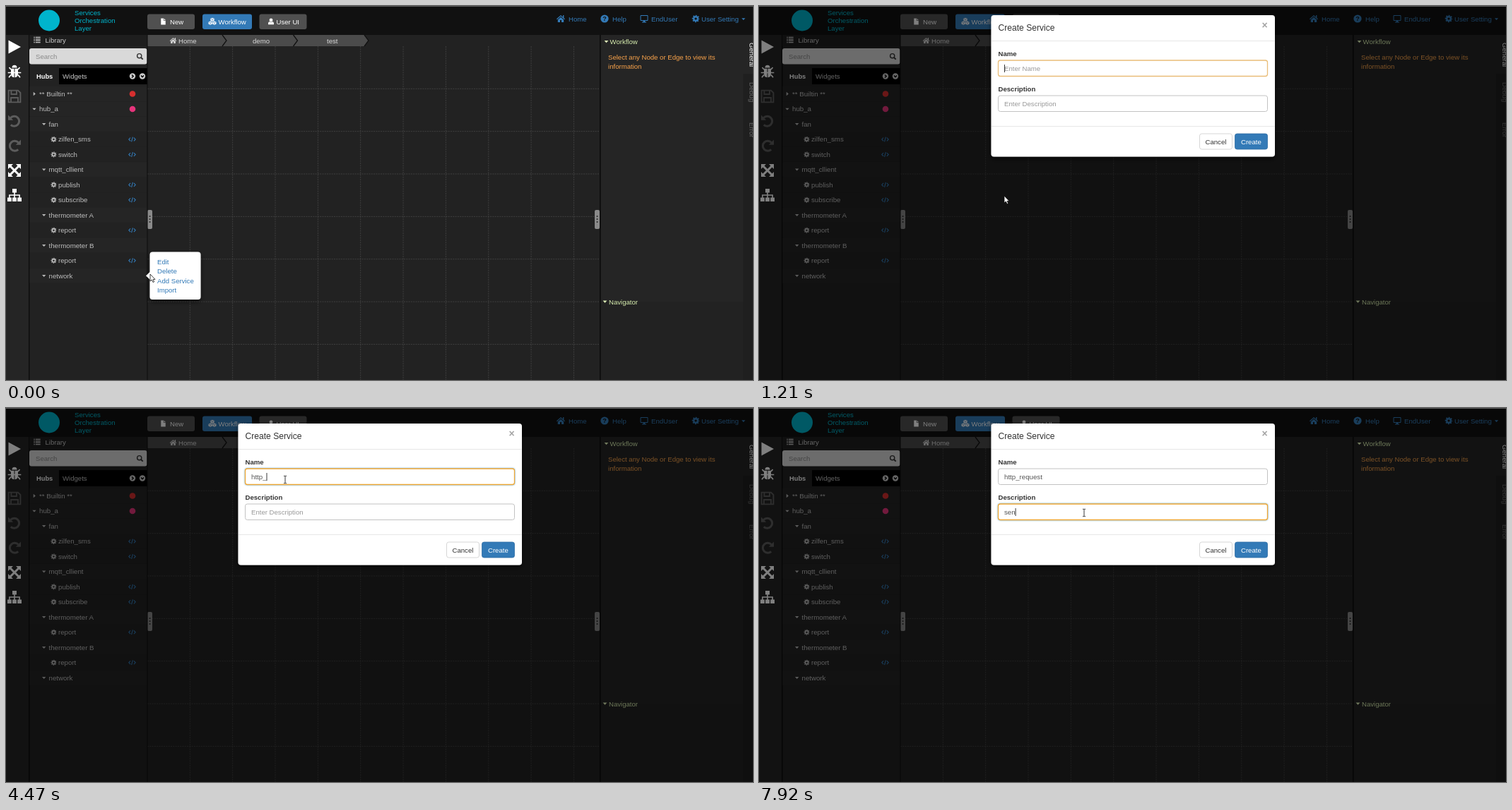
An HTML page for the animation above (8 s loop, 1057 by 530 pixels).

```html
<!DOCTYPE html>
<html lang="en">
<head>
<meta charset="utf-8">
<title>Create Service</title>
<style>
html, body { margin: 0; width: 100%; height: 100%; overflow: hidden; background: #222; }
svg { display: block; width: 1057px; height: 530px; font: 9.6px "Liberation Sans", Arial, sans-serif; }
text { white-space: pre; }
.line { fill: none; stroke: currentColor; }
.icon { fill: currentColor; }
</style>
</head>
<body>
<svg id="stage" viewBox="0 0 1057 530"></svg>
<script>
const BLUE = '#337ab7', BACK = '#222', PANEL = '#252525', BAR = '#111';
const rect = (x, y, w, h, fill, more = '') =>
  `<rect x="${x}" y="${y}" width="${w}" height="${h}" fill="${fill}" ${more}/>`;
// y is the vertical middle of the capitals
const label = (x, y, s, fill, more = '') =>
  `<text x="${x}" y="${y + 3.5}" fill="${fill}" ${more}>${s}</text>`;
const path = (d, more = '') => `<path d="${d}" ${more}/>`;
const line = (d, width = 1) => path(d, `class="line" stroke-width="${width}"`);
const disc = (r, more = '') => `<circle r="${r}" ${more}/>`;

const icons = {
  home: path('M-6 .3 0-5 6 .3 5.2 1.2 0-3.4-5.2 1.2zM-4.2 1.4 0-2.3 4.2 1.4V5H1V2H-1V5H-4.2zM3-5H4.4V-1L3-2.3z'),
  gear: disc(2.8, 'class="line" stroke-width="2.4"') +
    disc(4.5, 'class="line" stroke-width="1.6" stroke-dasharray="1.77" stroke-dashoffset=".9"'),
  help: disc(5.6) + `<text y="3.2" text-anchor="middle" font-weight="bold" font-size="9" fill="${BAR}">?</text>`,
  desktop: line('M-5-4.5H5V2.5H-5z', 1) + path('M-1 2.7H1L1.6 4.6H3V5.4H-3V4.6H-1.6z'),
  code: line('M-2.4-2.4-4.7 0-2.4 2.4M2.4-2.4 4.7 0 2.4 2.4M.9-3.4-.9 3.4', 1.1),
  down: path('M-3-1.5H3L0 1.8z'),
  right: path('M-1.4-3 2 0-1.4 3z'),
  list: [-3.6, -1.2, 1.2, 3.6].map(y => line(`M-4.7 ${y}H-3.2M-2.2 ${y}H4.7`, 1.3)).join(''),
  search: disc(3.1, 'cx="-.8" cy="-.8" class="line" stroke-width="1.4"') + line('M1.5 1.5 4.2 4.2', 1.9),
  file: path('M-3.6-5H.4V-1.4H3.6V5H-3.6zM1.2-5 3.6-2.2H1.2z'),
  cubes: ['0 -3', '-3.2 2.4', '3.2 2.4'].map(p =>
    `<g transform="translate(${p})">` + path('M0-2.9 2.9-1.6V1.6L0 2.9-2.9 1.6V-1.6z') +
    path('M-2-1.1 0-.3 2-1.1M0-.3V2', `fill="none" stroke="${BLUE}" stroke-width=".7"`) + '</g>').join(''),
  user: disc(2.7, 'cy="-2.2"') + path('M-4.4 4.8V2.5Q-4.2.2-2.2.3 0 1.6 2.2.3 4.2.2 4.4 2.5V4.8z'),
  play: path('M-8.5-9.5 9 0-8.5 9.5z'),
  bug: path('M-3.6-5.5A3.6 3.8 0 0 1 3.6-5.5zM-5-4.3H-.5V8.3Q-5 8-5 3zM5-4.3H.5V8.3Q5 8 5 3z') +
    line('M-5-3-7.5-6M5-3 7.5-6M-9.3 1.5H9.3M-5 4.5-8 8.2M5 4.5 8 8.2', 1.7),
  save: line('M-8.4-8.4H5L8.4-5V8.4H-8.4zM-4.6-8V-3H3V-8M-5 8V2H5V8', 1.9),
  undo: line('M-5.5-4.5A7 7 0 1 1-5.2 5.3', 3) + path('M-9-8.5V-1.3H-1.8z'),
  expand: line('M-6-6 6 6M6-6-6 6', 3) +
    path('M-9-9H-2L-9-2zM9-9V-2L2-9zM-9 9V2L-2 9zM9 9H2L9 2z'),
  sitemap: path('M-3-9H3V-3.5H-3zM-10 3.5H-4.2V9H-10zM-2.9 3.5H2.9V9H-2.9zM4.2 3.5H10V9H4.2z') +
    line('M0-4V4M-7.1 4V0H7.1V4', 1.6)
};
const icon = (name, x, y, color, scale = 1) =>
  `<g class="icon" color="${color}" transform="translate(${x} ${y}) scale(${scale})">${icons[name]}</g>`;

function header() {
  let s = rect(0, 0, 1057, 41, BAR) + rect(0, 0, 1057, 1, '#5a5a5a');
  s += '<circle cx="61" cy="20.5" r="15" fill="#00b4cc"/>';
  ['Services', 'Orchestration', 'Layer'].forEach((w, i) => s += label(97, 9.5 + i * 10.8, w, '#00b4cc'));
  [[200, 67, 'New', 'file', 22.5, 32], [278, 70, 'Workflow', 'cubes', 14, 22.5], [358.5, 67, 'User UI', 'user', 16.5, 24]]
    .forEach(([x, w, name, pic, ix, tx]) => {
      s += rect(x, 11.5, w, 21.5, name == 'Workflow' ? BLUE : '#505050', 'rx="3"') +
        icon(pic, x + ix, 22, '#fff', .9) + label(x + tx, 22, name, '#fff');
    });
  [[785, 'Home', 'home', 796], [847, 'Help', 'help', 858], [903, 'EndUser', 'desktop', 913], [976, 'User Setting', 'gear', 984]]
    .forEach(([x, name, pic, tx]) => s += icon(pic, x, 18, BLUE) + label(tx, 18, name, BLUE));
  return s + icon('down', 1043.5, 18.5, BLUE, .85);
}

function library() {
  let s = rect(0, 41, 32, 489, PANEL) + rect(32, 41, 1.5, 489, '#0c0c0c');
  ['play', 'bug', 'save', 'undo', 'redo', 'expand', 'sitemap'].forEach((name, i) => {
    const color = i > 1 && i < 5 ? '#5c5c5c' : '#fff', y = 58 + 35 * i;
    s += name == 'redo'
      ? `<g transform="matrix(-1 0 0 1 24 0)">${icon('undo', 12, y, color)}</g>`
      : icon(name, 12, y, color);
  });
  s += rect(33, 41, 167, 16, '#1e1e1e') + icon('list', 44, 48, '#ccc') + label(55.5, 48.5, 'Library', '#ccc') +
    rect(33, 60, 166.5, 22.5, '#d9d9d9', 'rx="3"') + label(42, 71.5, 'Search', '#8a8a8a') + icon('search', 189.5, 71.5, '#333') +
    rect(75, 88, 125, 23, '#000') + label(43, 99.5, 'Hubs', '#fff', 'font-weight="bold" font-size="9.3"') +
    label(80, 99.5, 'Widgets', '#c8c8c8');
  [[179, 'M-1-2 1.2 0-1 2'], [193, 'M-2-1 0 1.2 2-1']].forEach(([x, d]) =>
    s += `<g transform="translate(${x} 99.5)">` + disc(4.2, 'fill="#ccc"') + path(d, 'fill="none" stroke="#000" stroke-width="1.4"') + '</g>');
  // leading dashes give the depth in the tree
  '** Builtin **,hub_a,-fan,--zilfen_sms,--switch,-mqtt_cllient,--publish,--subscribe,-thermometer A,--report,-thermometer B,--report,-network'
    .split(',').forEach((row, i) => {
      const name = row.replace(/^-+/, ''), depth = row.length - name.length, y = 124.5 + 21.48 * i;
      s += rect(33.5, y - 10.7, 166.5, 21, depth == 2 ? BACK : PANEL);
      s += depth == 2
        ? icon('gear', 67.5, y, '#b8b8b8', .76) + icon('code', 178.5, y, BLUE)
        : icon(i ? 'down' : 'right', 40 + 13.7 * depth, y, '#b8b8b8', .9);
      if (!depth) s += `<circle cx="179" cy="${y}" r="4.3" fill="${i ? '#e5347b' : '#d62f2f'}"/>`;
      s += label(47 + 13.5 * depth, y, name, '#bdbdbd', 'font-size="9.7"');
    });
  return s + rect(199.5, 41, 1, 489, '#0c0c0c');
}

function canvas() {
  let grid = '', s = '';
  for (let k = 0; k < 10; k++) grid += `M${260.3 + 60.35 * k} 57V530`;
  for (let k = 0; k < 7; k++) grid += `M200 ${117.3 + 60.35 * k}H840`;
  s += path(grid, 'stroke="#484848" stroke-width=".8" stroke-dasharray="2 1.3"');
  [[512, 'test', 454], [411.5, 'demo', 349], [311, 'Home', 244]].forEach(([x, name, tx]) => {
    const tip = `${x - 5} 41 ${x + 1} 49 ${x - 5} 57`;
    s += path(`M200 41L${tip}H200z`, 'fill="#4b4b4b"') + path('M' + tip, 'fill="none" stroke="#111" stroke-width="1.3"') +
      label(tx, 49.5, name, '#d8d8d8');
  });
  s += icon('home', 236.5, 49, '#d8d8d8', .8);
  [[200, 203.5], [833, 836.5]].forEach(([x, cx]) => {
    s += rect(x, 289, 7, 27, '#8a8a8a', 'rx="2"');
    for (const y of [298, 302, 306]) s += rect(cx - .8, y - .8, 1.7, 1.7, '#222');
  });
  return s;
}

function sidebar() {
  let s = rect(840, 41, 217, 489, BACK) + rect(842, 41, 201, 378, PANEL) +
    rect(1043, 41, 14, 55, PANEL) + rect(1043, 96, 14, 434, '#1f1f1f') + rect(840, 41, 1.5, 489, '#0a0a0a');
  [['Workflow', 50.5, 849.5, 854.5], ['Navigator', 419, 847.5, 853]].forEach(([name, y, x, tx]) =>
    s += icon('down', x, y, '#e4f5bb', .95) + label(tx, y, name, '#d9efb0'));
  s += label(852, 72, 'Select any Node or Edge to view its', '#f9a34b') + label(852, 85.5, 'information', '#f9a34b');
  [['General', 52, '#fff'], ['Debug', 108, '#666'], ['Error', 165, '#666']].forEach(([name, y, color]) =>
    s += `<text transform="translate(1052 ${y}) rotate(90)" fill="${color}">${name}</text>`);
  return s;
}

const menu = () => rect(203.5, 348.5, 72, 67.5, '#fff', 'rx="4" filter="url(#soft)"') +
  path('M204.5 376 198 382.3 204.5 388.5z', 'fill="#fff"') +
  ['Edit', 'Delete', 'Add Service', 'Import'].map((name, i) =>
    label(214, 362.5 + 13.4 * i, name, BLUE, `id="item${i}"`)).join('') +
  '<rect id="ring" x="213.5" y="383.5" width="52" height="11.5" fill="none" stroke="#e59700" stroke-width=".8"/>';

const field = (id, y, hint) =>
  rect(338.5, y, 381, 22.5, '#fff', `rx="3" id="${id}Box"`) +
  label(347, y + 11, hint, '#999', `id="${id}Hint"`) + label(347, y + 11, '', '#555', `id="${id}" font-size="9.7"`) +
  rect(0, y + 6, .9, 11, '#222', `id="${id}Caret"`);

const modal = () => rect(328.5, 22, 401.5, 200.5, '#fff', 'rx="4" filter="url(#soft)"') +
  label(338.5, 40, 'Create Service', '#333', 'font-size="12.1"') +
  label(711.5, 37.5, '×', '#a5a5a5', 'font-size="14" font-weight="bold"') +
  rect(329, 58, 400.5, .8, '#e2e2e2') + rect(329, 179, 400.5, .8, '#e2e2e2') +
  label(338.5, 76.5, 'Name', '#333', 'font-weight="bold"') + field('name', 86, 'Enter Name') +
  label(338.5, 126, 'Description', '#333', 'font-weight="bold"') + field('desc', 136, 'Enter Description') +
  rect(623.5, 190, 46, 22, '#fff', 'rx="3" stroke="#ccc" stroke-width=".8"') + label(631.5, 201, 'Cancel', '#333') +
  rect(673.5, 190, 46, 22, BLUE, 'rx="3" stroke="#2e6da4" stroke-width=".8"') + label(682, 201, 'Create', '#fff');

const shapes = {
  arrow: path('M0 0V10L2.3 8 4 11.5 5.7 10.8 4.1 7.4H7z', 'fill="#fff" stroke="#111" stroke-width=".8"'),
  beam: path('M-2-5.2H-.6L0-4.7.6-5.2H2M-2 5.2H-.6L0 4.7.6 5.2H2M0-4.7V4.7', 'fill="none" stroke="#222" stroke-width=".9"'),
  hand: path('M-1 0H1V4.3L5.7 5.5V9L4.5 12H-2L-4.5 8-4 6.8-1 8.5z', 'fill="#fff" stroke="#111" stroke-width=".8"')
};

const stage = document.getElementById('stage');
stage.innerHTML = `<defs><filter id="soft" x="-20%" y="-20%" width="140%" height="140%">
  <feDropShadow dx="0" dy="3" stdDeviation="3.2" flood-color="#000" flood-opacity=".6"/></filter></defs>` +
  rect(0, 0, 1057, 530, BACK) + canvas() + header() + library() + sidebar() +
  `<g id="menu">${menu()}</g>` + rect(0, 1, 1057, 529, '#000', 'id="shade"') +
  `<g id="modal">${modal()}</g><g id="cursor"></g>`;

// [time, x, y, shape]
const moves = [
  [0, 204, 380, 'arrow'], [120, 212, 387, 'arrow'], [240, 224, 396, 'hand'], [360, 232, 403, 'hand'], [510, 232, 386, 'hand'],
  [1090, 232, 378, 'arrow'], [1210, 347, 269, 'arrow'], [1330, 379, 184, 'arrow'], [1450, 391, 132, 'arrow'],
  [1570, 394, 114, 'arrow'], [1700, 395, 111, 'arrow'], [1820, 395, 108, 'beam'], [1970, 395, 101.5, 'beam'],
  [6180, 431.5, 142.5, 'beam'], [6330, 441, 190, 'arrow'], [6580, 480, 174, 'arrow'], [6710, 468.5, 163, 'arrow'],
  [6840, 460, 156.5, 'beam'], [6980, 460, 148.5, 'beam']
];
// [time, modal offset, modal opacity, shade opacity]
const poses = [[1090, -35, .45, .22], [1210, -9, 1, .5], [1330, -1, 1, .5], [1450, 0, 1, .5]];
const typing = {
  name: ['http_request', [3260, 3540, 3820, 3950, 4470, 4870, 5010, 5260, 5390, 5520, 5800, 5800]],
  desc: ['sen', [7530, 7800, 7920]]
};
const get = id => document.getElementById(id);
const set = (id, attrs) => { for (const k in attrs) get(id).setAttribute(k, attrs[k]); };
const show = (id, on) => set(id, { visibility: on ? 'inherit' : 'hidden' });
const last = (list, t) => list.filter(e => e[0] <= t).pop();
const within = (t, a, b) => t >= a && t < b;

function drawField(id, t, focus, caret) {
  const [word, times] = typing[id], typed = word.slice(0, times.filter(k => k <= t).length);
  get(id).textContent = typed;
  show(id + 'Hint', !typed);
  show(id + 'Caret', caret);
  set(id + 'Caret', { x: 347 + (typed ? get(id).getComputedTextLength() : 0) });
  set(id + 'Box', { stroke: ['#bbb', '#e9bd78', '#f0a732'][focus], 'stroke-width': focus ? 1.3 : .9 });
  get(id + 'Box').style.filter = focus == 2 ? 'drop-shadow(0 0 1px #66afe9)' : 'none';
}

function draw(t) {
  const [, x, y, shape] = last(moves, t);
  get('cursor').innerHTML = shapes[shape];
  set('cursor', { transform: `translate(${x} ${y})` });

  show('menu', t < 1090);
  show('ring', within(t, 940, 1090));
  [[2, t >= 510], [3, within(t, 360, 510)]].forEach(([i, on]) =>
    set('item' + i, { fill: on ? '#23527c' : BLUE, 'text-decoration': on ? 'underline' : 'none' }));

  const [, dy, alpha, dim] = last(poses, t) || [0, 0, 0, 0];
  set('shade', { opacity: dim });
  set('modal', { opacity: alpha, transform: `translate(0 ${dy})` });
  const blink = within(t, 2990, 3260) || within(t, 6840, 6980);
  drawField('name', t, t < 1210 ? 0 : t < 1330 ? 1 : t < 7130 ? 2 : 0, t < 7130 && !blink);
  drawField('desc', t, t < 7130 ? 0 : t < 7250 ? 1 : 2, t >= 7250);
}

const start = performance.now();
function tick() {
  draw((performance.now() - start) % 8000);
  requestAnimationFrame(tick);
}
tick();
</script>
</body>
</html>
```
